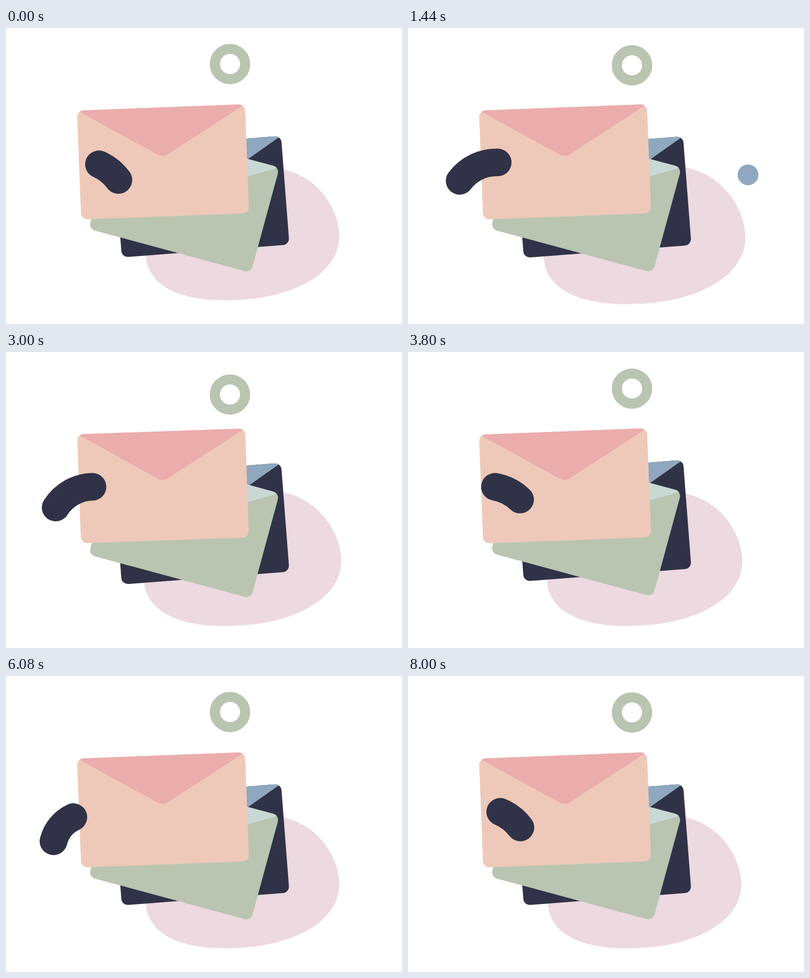
Write an HTML page that moves like this. It is 800 px wide and 600 px high and loops after 8.04 s.

```html
<!DOCTYPE html>
<html lang="en">
<head>
<meta charset="utf-8">
<title>Envelopes</title>
<style>
  html, body { margin: 0; width: 100%; height: 100%; overflow: hidden; background: #fff; }
  svg { display: block; width: 800px; height: 600px; }
</style>
</head>
<body>
<svg viewBox="0 0 800 600">
  <defs>
    <rect id="body" x="-169.75" y="-110.5" width="339.5" height="221" rx="13"/>
    <path id="flap" d="M-164.8-107.8L-12-16Q0-7.5 12-16L164.8-107.8A13 13 0 0 0 156.75-110.5H-156.75A13 13 0 0 0-164.8-107.8Z"/>
  </defs>
  <circle id="ball" r="21" fill="#8fa8bf"/>
  <path id="blob" fill="#edd9e0" d="M282 462C285 520 345 552.5 442 552.5C578 552.5 674 499 674 422C674 377 640 301 555 285C480 272 278 380 282 462Z"/>
  <g id="back"><use href="#body" fill="#303247"/><use href="#flap" fill="#8fa8bf"/></g>
  <g id="middle"><use href="#body" fill="#b9c4b1"/><use href="#flap" fill="#c9d8d4"/></g>
  <g id="front"><use href="#body" fill="#eec9b9"/><use href="#flap" fill="#ebacac"/></g>
  <circle id="ring" r="30.6" fill="none" stroke="#b9c4b1" stroke-width="20.4"/>
  <path id="worm" fill="none" stroke="#303247" stroke-width="56" stroke-linecap="round"/>
</svg>
<script>
const LOOP = 8.04, BEAT = LOOP / 4, CRAWL = LOOP / 2, HIT = .88;

const ramp = (t, from, to) => Math.min(1, Math.max(0, (t - from) / (to - from)));
const smooth = (t, from, to) => (1 - Math.cos(Math.PI * ramp(t, from, to))) / 2;
const bump = (t, from, peak, to) => smooth(t, from, peak) - smooth(t, peak, to);

const part = id => document.getElementById(id);
const move = (id, value) => part(id).setAttribute("transform", value);
const place = (id, x, y, angle = 0) => move(id, `translate(${x} ${y}) rotate(${angle})`);

// Wind up, fall on the front envelope, rebound.
function drawRing(b) {
  const y = b < HIT
    ? 73 - 23 * smooth(b, .26, .53) + 71 * ramp(b, .53, HIT) ** 2
    : 73 + 48 * Math.exp(-Math.sqrt(15 * (b - HIT)));
  const squash = .05 * bump(b, .82, HIT, .94);
  move("ring", `translate(452.5 ${y}) scale(${1 + squash} ${1 - squash})`);
}

// The push passes from the front envelope to the back one.
function drawEnvelopes(b) {
  const drop = 8.7 * bump(b, .81, HIT, .985), tilt = 2 * bump(b, .81, HIT, 1.02);
  place("front", 317.3, 271.4 + drop, tilt - 2.17);
  place("middle", 359.8, 345 + 3.7 * bump(b, .81, .95, 1.28), 15.17);
  place("back", 394.8, 341.8 + 6.2 * bump(b, .83, .99, 1.6), -4.39);
}

function drawBlob(b) {
  const size = .996 + .045 * bump(b, .7, 1.33, BEAT);
  const sink = 2.5 * bump(b, .5, 1.7, BEAT);
  move("blob", `translate(478.3 ${420 + sink}) scale(${size}) translate(-478.3 -420)`);
}

// One turn per beat on a slanted ellipse, slow at the bottom and fast at the top.
function drawBall(b) {
  const rest = .32, top = 1.1, t = b < rest ? b + BEAT : b;
  const deg = t < top
    ? 80 + 195 * ramp(t, rest, top) ** 2.7
    : 440 - 165 * (1 - ramp(t, top, rest + BEAT)) ** 2.3;
  const a = deg * Math.PI / 180;
  place("ball", 463 + 224 * Math.cos(a), 378 + 165 * Math.sin(a - .54));
}

const bezier = (s, p0, p1, p2, p3) => {
  const q = 1 - s;
  return q * q * q * p0 + 3 * q * q * s * p1 + 3 * q * s * s * p2 + s * s * s * p3;
};
const rail = s => [bezier(s, 227, 222, 86, 96), bezier(s, 304, 236, 292, 335)];

// Both ends run along a rail to the left and back; the head leads, the tail follows.
function drawWorm(t) {
  const c = (t - .25 + CRAWL) % CRAWL, u = Math.min(c, CRAWL - c);
  const [hx, hy] = rail(.325 + .675 * smooth(u, .1, 1.8));
  const [tx, ty] = rail(.645 * (1 - (1 - ramp(u, .42, BEAT)) ** 1.3));
  const sag = 8 * (1 - smooth(u, 0, .5)), r = 98 - 26 * smooth(u, .8, BEAT);
  part("worm").setAttribute("d", `M${hx} ${hy + sag}A${r} ${r} 0 0 1 ${tx} ${ty + sag}`);
}

const start = performance.now();
function frame() {
  const t = (performance.now() - start) / 1000 % LOOP, b = t % BEAT;
  drawRing(b);
  drawEnvelopes(b);
  drawBlob(b);
  drawBall(b);
  drawWorm(t);
  requestAnimationFrame(frame);
}
frame();
</script>
</body>
</html>
```
